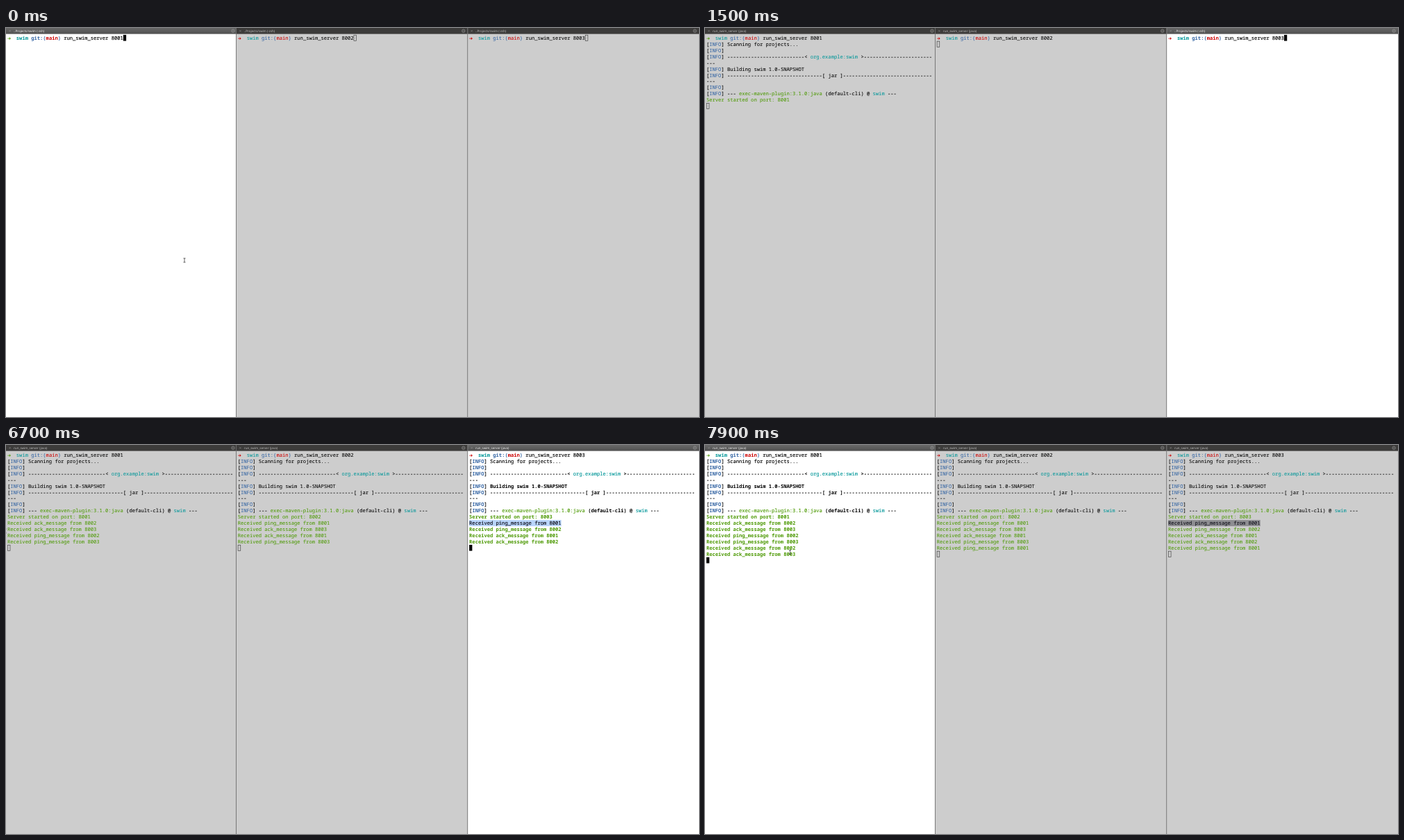
Recreate the animation shown at these times as an HTML page. Size 998x561 px, loop 8 s.

```html
<!DOCTYPE html>
<html lang="en">
<head>
<meta charset="utf-8">
<title>Three terminals</title>
<style>
  html, body { margin: 0; width: 100%; height: 100%; overflow: hidden; background: #fff; }
  svg { display: block; width: 100vw; height: 100vh; }
  text { white-space: pre; text-rendering: geometricPrecision; }
  .term { font: 400 7.13px "Noto Sans Mono", "DejaVu Sans Mono", monospace; }
  .term text { stroke-width: .06; }
  .active .term text { stroke-width: .14; }
  .active .term .bold { font-weight: 700; stroke-width: 0; }
  .term .arrow { font-family: "DejaVu Sans", "DejaVu Sans Mono", sans-serif; font-size: 6px; }
  .title { font: 4.5px "Noto Sans", "Open Sans", sans-serif; }
</style>
</head>
<body>
<svg viewBox="0 0 998 561" preserveAspectRatio="none">
  <defs>
    <linearGradient id="bar" x2="0" y2="1">
      <stop stop-color="#686868"/><stop offset="1" stop-color="#505050"/>
    </linearGradient>
  </defs>
  <g id="panes"></g>
  <path d="M331.5 0V561M664.7 0V561" stroke="#6c6c6c" stroke-width=".9"/>
  <path id="pointer" d="M-1.5-2.9H1.5M0-2.9V2.9M-1.5 2.9H1.5" fill="none" stroke="#222" stroke-width=".7"/>
</svg>
<script>
const LOOP = 8000, STEP = 100;
const CHAR = 4.278, ROW = 8.935, TOP = 9.9, BAR = 8.6;
const BLACK = '#000', BLUE = '#3465a4', CYAN = '#06989a', RED = '#cc0000', GREEN = '#4e9a06';

// enter: command sent; java: process takes over the terminal
const panes = [
  { left: 0, port: 8001, arrow: GREEN, enter: 200, java: 600 },
  { left: 331.8, port: 8002, arrow: RED, enter: 1200, java: 1500 },
  { left: 665.1, port: 8003, arrow: RED, enter: 1700, java: 2050 },
];
const PRINT_TIME = 150, PING_PERIOD = 3400, STARTUP_ROWS = 11;
const SELECTED_PANE = 2, SELECTED_ROW = 11, SELECTED_CHARS = 31;
const drag = { start: 5100, end: 5800 };

const focusedPane = t =>
  t < panes[0].java + 300 ? 0 : t < panes[1].java ? 1 : t < 6900 ? 2 : t < 7100 ? 1 : 0;

const clamp = v => Math.max(0, Math.min(1, v));
const progress = (t, { start, end }) => clamp((t - start) / (end - start));

// Each move bends from the previous resting point through a control point
const moves = [
  { start: 2500, end: 3200, via: [932, 30], to: [776, 122] },
  { start: 4200, end: 5100, via: [788, 117], to: [800.5, 113] },
  { ...drag, via: [733, 113], to: [665, 113] },
  { start: 5900, end: 6300, via: [332, 242], to: [-1, 124] },
  { start: 7300, end: 7900, via: [20, -101], to: [122.5, 154.5] },
];

function pointAt(t) {
  if (t < panes[0].enter) return [257, 335];
  if (t < moves[0].start) return [-9, 0];
  let from = [527, 328];
  for (const move of moves) {
    if (t < move.start) break;
    const k = progress(t, move);
    from = from.map((v, i) => (1 - k) ** 2 * v + 2 * k * (1 - k) * move.via[i] + k * k * move.to[i]);
  }
  return from;
}

// Every server pings its two peers once per period and gets their acks
const traffic = panes.flatMap(({ java }, sender) => {
  const sent = [];
  for (let round = java + PING_PERIOD; round < LOOP; round += PING_PERIOD)
    for (const hop of [1, 2]) {
      const peer = (sender + hop) % panes.length, time = round + (hop - 1) * STEP;
      sent.push({ time, at: peer, kind: 'ping', from: sender }, { time, at: sender, kind: 'ack', from: peer });
    }
  return sent;
}).sort((a, b) => a.time - b.time);

function startupRows({ enter, java }, t) {
  if (t < enter) return 0;
  return 1 + Math.floor((STARTUP_ROWS - 1) * clamp((t - java) / PRINT_TIME));
}

// A line is a list of [text, colour, class]
const bold = (text, colour = BLACK) => [text, colour, 'bold'];
const dashes = n => bold('-'.repeat(n));
const info = (...parts) => [['[', BLACK], bold('INFO', BLUE), ['] ', BLACK], ...parts];

const startupLines = ({ port, arrow }) => [
  [['➜', arrow, 'arrow'], ['  ', BLACK], bold('swim', CYAN), [' ', BLACK], bold('git:(', BLUE),
    bold('main', RED), bold(')', BLUE), [' run_swim_server ' + port, BLACK]],
  info(['Scanning for projects...', BLACK]),
  info(),
  info(dashes(26), bold('< '), ['org.example:swim', CYAN], bold(' >'), dashes(23)),
  [dashes(3)],
  info(bold('Building swim 1.0-SNAPSHOT')),
  info(dashes(32), bold('[ jar ]'), dashes(30)),
  [dashes(3)],
  info(),
  info(dashes(3), [' ', BLACK], ['exec-maven-plugin:3.1.0:java', GREEN], bold(' (default-cli)'),
    [' @ ', BLACK], ['swim', CYAN], [' ', BLACK], dashes(3)),
  [bold('Server started on port: ' + port, GREEN)],
];

const messageLines = (index, t) => traffic
  .filter(m => m.at === index && m.time <= t)
  .map(m => [bold(`Received ${m.kind}_message from ${panes[m.from].port}`, GREEN)]);

const escapeText = s => s.replace(/</g, '&lt;').replace(/>/g, '&gt;');
const rect = (x, y, w, h, fill, extra = '') =>
  `<rect x="${x}" y="${y}" width="${w}" height="${h}" fill="${fill}" ${extra}/>`;

function lineMarkup(line, row, x) {
  const y = TOP + ROW * row + 7;
  return line.map(([text, colour, cls = '']) => {
    const at = x;
    x += text.length * CHAR;
    return text.trim() &&
      `<text class="${cls}" x="${at}" y="${y}" fill="${colour}" stroke="${colour}">${escapeText(text)}</text>`;
  }).join('');
}

function barMarkup({ left, enter, java }, active, t) {
  const title = t < enter ? '..Projects/swim (-zsh)' : `run_swim_server (${t < java ? '-zsh' : 'java'})`;
  const ink = active ? '#eee' : '#bbb', x = left + 5.6, end = left + 327;
  return rect(left, 0, 333, BAR, active ? 'url(#bar)' : '#3c3b3a') +
    `<path d="M${x - 1.2} 3.1l2.4 2.4m0-2.4l-2.4 2.4" stroke="#999" stroke-width=".5"/>
     <text class="title" x="${left + 11}" y="5.9" fill="${ink}">${title}</text>
     <circle cx="${end}" cy="4.2" r="2.2" fill="none" stroke="#aaa" stroke-width=".6"/>
     <path d="M${end - 1.2} 4.2h2.4" stroke="#aaa" stroke-width=".5"/>`;
}

function paneMarkup(pane, index, t) {
  const { left } = pane, textX = left + 2;
  const active = focusedPane(t) === index;
  const printed = startupRows(pane, t);
  const lines = [...startupLines(pane).slice(0, Math.max(1, printed)), ...messageLines(index, t)];
  const selected = index === SELECTED_PANE ? Math.round(SELECTED_CHARS * progress(t, drag)) : 0;
  let out = rect(left, 0, 333, 561, active ? '#fff' : '#cdcdcd');

  if (selected) {
    const [[message]] = lines[SELECTED_ROW], split = SELECTED_CHARS - selected;
    lines[SELECTED_ROW] = [bold(message.slice(0, split), GREEN), [message.slice(split), '#0a0a14']];
    out += rect(textX + split * CHAR, TOP + SELECTED_ROW * ROW, selected * CHAR, ROW, active ? '#b9d5fb' : '#8d8d91');
  }
  out += `<g class="term">${lines.map((line, row) => lineMarkup(line, row, textX)).join('')}</g>`;

  const cx = textX + (printed ? 0 : 39 * CHAR), cy = TOP + (printed && lines.length) * ROW;
  out += active
    ? rect(cx, cy, CHAR, 8.7, BLACK)
    : rect(cx + .3, cy + .3, CHAR - .6, 8.2, 'none', 'stroke="#333" stroke-width=".6"');
  return `<g class="${active ? 'active' : ''}">${out}${barMarkup(pane, active, t)}</g>`;
}

const stage = document.getElementById('panes');
const pointer = document.getElementById('pointer');
let shown = -1;

function render(t) {
  stage.innerHTML = panes.map((pane, i) => paneMarkup(pane, i, t)).join('');
  pointer.setAttribute('transform', `translate(${pointAt(t)})`);
}

const start = performance.now();
function tick() {
  const t = Math.floor((performance.now() - start) % LOOP / STEP) * STEP;
  if (t !== shown) render(shown = t);
  requestAnimationFrame(tick);
}
tick();
</script>
</body>
</html>
```
